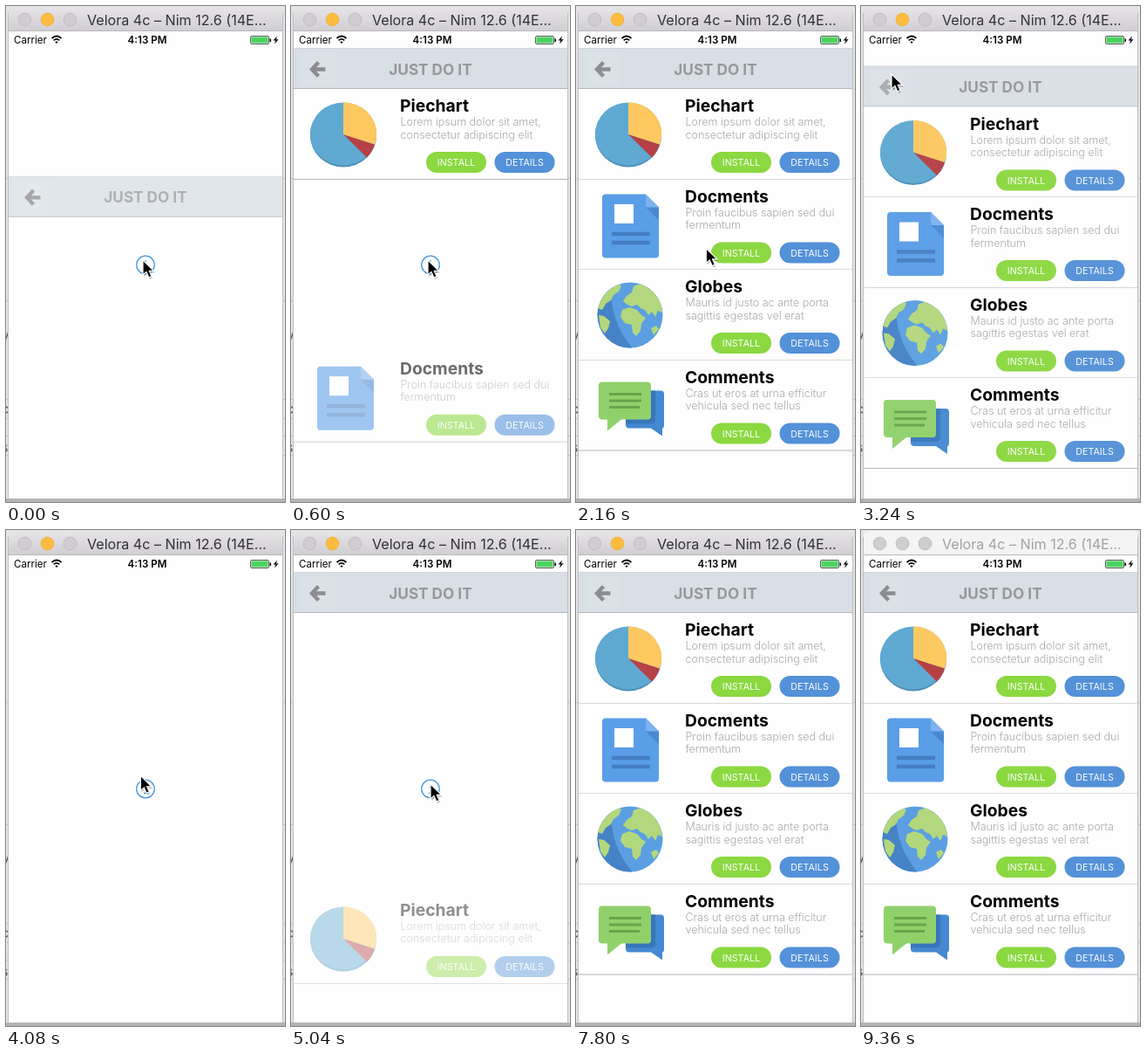
These frames come from a looping animation (320x568 px, 9600 ms). An HTML page:

```html
<!DOCTYPE html>
<html lang="en">
<head>
<meta charset="utf-8">
<title>Staggered list</title>
<style>
html, body { margin: 0; width: 100%; height: 100%; overflow: hidden; background: #e4e4e4; }
svg { display: block; width: 320px; height: 568px; font-family: Inter, Roboto, sans-serif; }
.name { font-size: 19.3px; font-weight: 700; }
.desc { font-size: 12.5px; font-weight: 300; fill: #a9a9a9; }
.label { font-size: 10.6px; fill: #fff; text-anchor: middle; letter-spacing: .1px; }
.status { font-size: 11.6px; }
</style>
</head>
<body>
<svg viewBox="0 0 320 568">
  <defs>
    <clipPath id="page"><rect x="3" y="48" width="314" height="516"/></clipPath>
    <clipPath id="ball"><circle cx="62" cy="52" r="37.5"/></clipPath>
    <linearGradient id="chrome" x2="0" y2="1">
      <stop stop-color="#e7e4e8"/><stop offset="1" stop-color="#d1ced3"/>
    </linearGradient>
  </defs>

  <!-- desktop behind the window -->
  <rect width="320" height="568" fill="#e4e4e4"/>
  <path d="M0 197.500H320M0 337.500H320M0 450.500H320M0 472.500H320M0 492.500H320M0 514.500H320" stroke="#c4c4c4"/>
  <g font-size="16" fill="#555"><text x="-5" y="382">y</text><text x="-6" y="467">c</text><text x="-6" y="511">s</text></g>
  <rect y="564" width="320" height="4" fill="#b4b4b4"/>
  <path d="M2.500 8V564M317.500 8V564" stroke="#bdbdbd"/>

  <!-- window -->
  <rect x="3" y="28" width="314" height="536" fill="#fefefe"/>
  <path id="bar" d="M3 29V6Q3 1 8 1H312Q317 1 317 6V29Z" fill="url(#chrome)"/>
  <path d="M3 28.500H317" stroke="#b9b8b9"/>
  <g stroke="#bbb9bb" stroke-width=".8" fill="#cfcdcf">
    <circle cx="21.500" cy="15.500" r="7.400"/>
    <circle id="lamp" cx="47.500" cy="15.500" r="7.400"/>
    <circle cx="73.500" cy="15.500" r="7.400"/>
  </g>
  <text id="caption" x="93" y="21.500" font-size="16.100">Velora 4c – Nim 12.6 (14E...</text>
  <text class="status" x="9" y="43">Carrier</text>
  <path d="M52.500 37Q58 32 63.500 37M54.700 39.300Q58 36.300 61.300 39.300" fill="none" stroke="#000" stroke-width="1.700"/>
  <path d="M56.300 41.200Q58 39.600 59.700 41.200L58 43Z"/>
  <text class="status" x="162" y="43" text-anchor="middle" font-weight="600">4:13 PM</text>
  <rect x="280.500" y="34.500" width="21" height="9" rx="1.500" fill="#fff" stroke="#333" stroke-width=".8"/>
  <rect x="281.500" y="35.500" width="19" height="7" fill="#4cd35f"/>
  <path d="M302.500 37.500H304V41H302.500ZM311 34.500L306.500 39.600H309.200L308 43.500L312.500 38.200H309.800Z"/>

  <g clip-path="url(#page)">
    <g stroke="#4a97de" stroke-width="1.300" fill="none">
      <circle cx="160" cy="296.500" r="10.300"/>
      <path d="M158.500 295H160.300V301.500M158 301.500H162.500M160 291V292.700"/>
    </g>
    <g id="list">
      <g>
        <rect x="3" width="314" height="47" fill="#d9dfe6"/>
        <rect x="12" y="5" width="38" height="38" fill="#dbe2e7"/>
        <path d="M3 .5H317" stroke="#d0d4da"/><path d="M3 46.500H317" stroke="#b3b5b9"/>
        <path id="back" d="M31.500 16.500L24 24.500L31.500 32.500M25 24.500H39.500" fill="none" stroke="#8c8d91" stroke-width="4.400"/>
        <text x="160" y="30.500" text-anchor="middle" font-size="17.200" font-weight="700" fill="#97989b">JUST DO IT</text>
      </g>
    </g>
  </g>

  <g id="cursor">
    <path d="M1 2V19L5 15.500L8 22L11 20.500L8.500 14.500H14Z" opacity=".25"/>
    <path d="M0 0V17L4 13.500L6.800 20L10 18.600L7.300 12.400H12.500Z" stroke="#fff" stroke-width="1.200"/>
  </g>
</svg>

<script>
const $ = id => document.getElementById(id);

// Icons, relative to the top of a row
const pie = `
  <ellipse cx="60" cy="53" rx="38" ry="36.500" fill="#4a90bb"/>
  <ellipse cx="60" cy="51.500" rx="38" ry="36" fill="#5fa9d2"/>
  <path d="M60 52L96 63.500Q93 73 87 78.500Z" fill="#b54045"/>
  <path d="M60 52V15.500A38 36 0 0 1 96 63.500Z" fill="#fdc85f"/>`;
const doc = `
  <path d="M34 17H80L95 32V86Q95 90 91 90H34Q30 90 30 86V21Q30 17 34 17Z" fill="#5a9ee8"/>
  <path d="M80 32H95V47Z" fill="#4a88d2"/>
  <path d="M80 17L95 32H82Q80 32 80 30Z" fill="#7db1ef"/>
  <path d="M41 62.500H85M41 72.500H85" stroke="#467dc2" stroke-width="4.500"/>
  <rect x="44" y="28.500" width="22" height="22" fill="#fff"/>`;
const globe = `
  <circle cx="62" cy="52" r="37.500" fill="#5b9fe2"/>
  <g clip-path="url(#ball)">
    <path d="M40 14Q38 60 66 91H20V14Z" fill="#4583c6"/>
    <g fill="#b3d77c">
      <path d="M29 30L37 20L47 16L52 18L49 25L43 29L40 35L34 39L30 46L25 44Z"/>
      <path d="M26 52L32 53L39 59L37 67L33 73L28 66Z"/>
      <path d="M54 36L58 30L64 26L66 19L74 16L88 24L97 37L99 49L94 47L91 54L87 48L83 52L79 46L74 44L70 40L64 42L59 40Z"/>
      <path d="M53 46L61 43L70 46L75 52L80 55L75 62L74 70L69 76L65 72L64 63L56 61L51 54Z"/>
      <path d="M86 67L92 64L95 68L89 75Z"/>
    </g>
  </g>`;
const chat = `
  <path d="M61 35H97Q101 35 101 39V74Q101 78 99 78V87L86 78H61Q57 78 57 74V39Q57 35 61 35Z" fill="#4489d2"/>
  <path d="M86 35V64Q86 68 82 68H57V73H86Q91 73 91 68V35Z" fill="#3877bb"/>
  <path d="M30 25H82Q86 25 86 29V64Q86 68 82 68H52L36 81V68H30Q26 68 26 64V29Q26 25 30 25Z" fill="#91d16c"/>
  <path d="M38 39H75M38 46.500H75M38 54H73" stroke="#68a44a" stroke-width="3"/>`;

const pill = (x, color, label) => `
  <rect x="${x}" y="72" width="69" height="24" rx="12" fill="${color}"/>
  <text class="label" x="${x + 34.5}" y="88">${label}</text>`;

const row = (icon, name, line1, line2) => `<g>
  <rect x="3" width="314" height="103.500" fill="#fefefe"/>
  ${icon}
  <text class="name" x="125" y="26">${name}</text>
  <text class="desc" x="125.500" y="42">${line1}</text>
  <text class="desc" x="125.500" y="56.500">${line2}</text>
  ${pill(155, "#8bd840", "INSTALL")}${pill(233.5, "#5391d8", "DETAILS")}
  <path d="M3 103.500H317" stroke="#b4b4b6"/></g>`;

const list = $("list");
list.innerHTML +=
  row(pie, "Piechart", "Lorem ipsum dolor sit amet,", "consectetur adipiscing elit") +
  row(doc, "Docments", "Proin faucibus sapien sed dui", "fermentum") +
  row(globe, "Globes", "Mauris id justo ac ante porta", "sagittis egestas vel erat") +
  row(chat, "Comments", "Cras ut eros at urna efficitur", "vehicula sed nec tellus");

const LOOP = 9600, STEP = 120, ENTER = 646, LEAVE = 600, LEAVE_AT = 3159, SECOND = 4865;
const tops = [48, 95, 198.5, 302, 405.5];
const starts = [-491, -104, 230, 563, 896];
const clamp = v => Math.min(1, Math.max(0, v));
const ease = p => p < .5 ? 2 * p * p : 1 - 2 * (1 - p) ** 2;

// Cursor stops: time, x, y
const path = [
  [0, 157, 291], [2000, 157, 291], [2900, 35, 78], [3400, 35, 78],
  [4200, 160, 291], [6800, 160, 291], [7500, 335, 420], [LOOP, 335, 420]
];

function cursorAt(t) {
  const i = path.findIndex(stop => stop[0] > t);
  const [t0, x0, y0] = path[i - 1], [t1, x1, y1] = path[i];
  const p = ease((t - t0) / (t1 - t0));
  return [x0 + (x1 - x0) * p, y0 + (y1 - y0) * p];
}

function draw(t) {
  const leaving = t >= LEAVE_AT && t < SECOND + starts[0];
  const phase = t < LEAVE_AT ? t : t - SECOND;
  const gone = ease(clamp((t - LEAVE_AT) / LEAVE));
  [...list.children].forEach((item, i) => {
    const rest = leaving ? gone : 1 - clamp((phase - starts[i]) / ENTER);
    const shift = rest * (leaving ? 564 : 660 - tops[i]);
    item.setAttribute("transform", `translate(0 ${tops[i] + shift})`);
    item.setAttribute("opacity", 1 - rest);
  });
  $("back").setAttribute("opacity", t >= 3120 && t < 3400 ? .65 : 1);
  $("cursor").setAttribute("transform", `translate(${cursorAt(t)})`);

  const active = t < 8640;
  $("bar").setAttribute("fill", active ? "url(#chrome)" : "#f4f4f4");
  $("lamp").setAttribute("fill", active ? "#fcbc40" : "#cfcdcf");
  $("lamp").setAttribute("stroke", active ? "#eeb03a" : "#bbb9bb");
  $("caption").setAttribute("fill", active ? "#333" : "#a2a2a2");
}

function tick() {
  const t = performance.now() % LOOP;
  draw(Math.floor(t / STEP) * STEP);
  requestAnimationFrame(tick);
}
tick();
</script>
</body>
</html>
```
